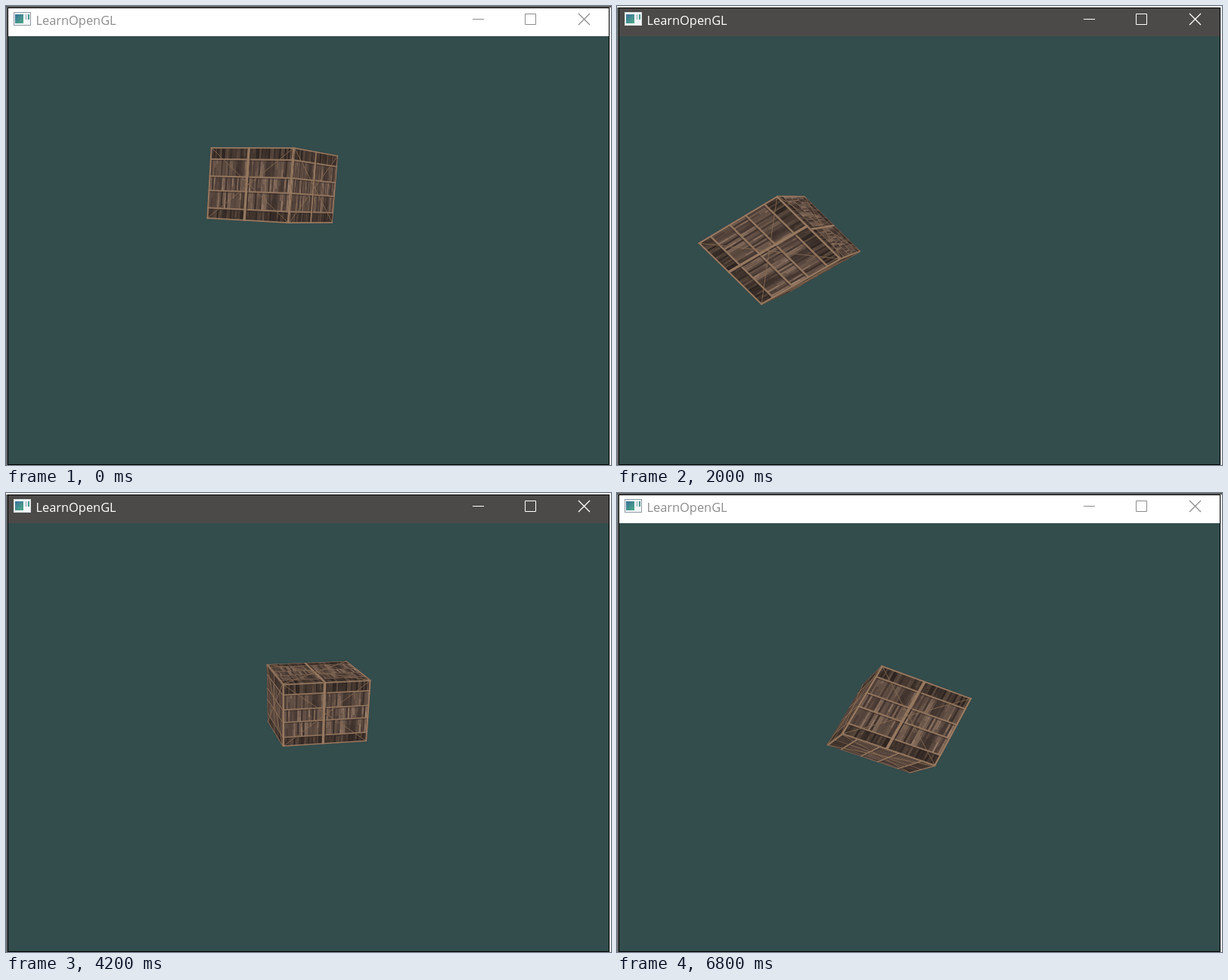
Animation of 800 by 608 pixels, one loop 6.9 s. Source, as an HTML page with a canvas:

```html
<!DOCTYPE html>
<html lang="en">
<head>
<meta charset="utf-8">
<title>LearnOpenGL</title>
<style>
  html, body { margin: 0; width: 100%; height: 100%; overflow: hidden; background: #334c4c; }
  canvas { display: block; }
</style>
</head>
<body>
<canvas id="stage" width="800" height="608"></canvas>
<script>
const ctx = document.getElementById('stage').getContext('2d');
const LOOP = 6900, STEP = 100;
const RAD = Math.PI / 180;
const CX = 402, CY = 340, FX = 966, FY = 724;

// Turning points of the camera, as [seconds, value]
const SIDE = [[0.3, 354], [0.8, 450], [1.45, 200], [1.75, 485], [2.05, 202], [2.35, 488],
  [2.9, 165], [3.7, 391], [4.2, 410], [5.1, 410], [5.6, 360], [6.4, 370]];
const HEIGHT = [[0.3, 239], [0.85, 505], [1.6, 265], [2, 320], [2.7, 328], [3.78, 328],
  [5.05, 122], [5.7, 304]];
const RANGE = [[1, 8], [2, 7.6], [4.2, 8.7], [5.1, 6.6], [5.8, 7.6]];
const TILT = [[2, 13], [2.8, 19], [5.1, 11.5], [6, 13]];
const SPIN = [[0, -34.5], [2, 161.5], [2.7, 223], [4.2, 375], [6.8, 632]];

const linear = x => x;
const swing = x => (1 - Math.cos(Math.PI * x)) / 2;

function track(keys, t, ease = swing) {
  const next = keys.findIndex(k => k[0] > t);
  if (next === 0) return keys[0][1];
  if (next < 0) return keys[keys.length - 1][1];
  const [t0, a] = keys[next - 1], [t1, b] = keys[next];
  return a + (b - a) * ease((t - t0) / (t1 - t0));
}

function random(seed) {
  return () => {
    seed = (seed * 1664525 + 1013904223) >>> 0;
    return seed / 4294967296;
  };
}

// Spin about (0.5, 1, 0), seen by a camera turned so the centre falls on (u, v)
function makeCamera(t) {
  const u = track(SIDE, t), v = track(HEIGHT, t), r = track(RANGE, t);
  const spin = track(SPIN, t, linear) * RAD;
  const c = Math.cos(spin), s = Math.sin(spin), n = 1 - c;
  const ax = Math.sqrt(0.2), ay = 2 * ax;
  const tilt = track(TILT, t) * RAD;
  const st = Math.sin(tilt), ct = Math.cos(tilt);

  const dx = (u - CX) / FX, dy = (CY - v) / FY;
  const yaw = -Math.asin(dx / Math.hypot(dx, dy, 1) / ct);
  const cy = Math.cos(yaw), sy = Math.sin(yaw);
  const pitch = Math.atan2(-1, dy) - Math.atan2(-ct * cy, -st);
  const cp = Math.cos(pitch), sp = Math.sin(pitch);

  return ([x, y, z]) => {
    const wx = (c + 0.2 * n) * x + 0.4 * n * y + ay * s * z;
    const wy = 0.4 * n * x + (c + 0.8 * n) * y - ax * s * z - st * r;
    const wz = -ay * s * x + ax * s * y + c * z - ct * r;
    const ex = wx * cy + wz * sy, ez = wz * cy - wx * sy;
    return [ex, wy * cp - ez * sp, wy * sp + ez * cp];
  };
}

const toScreen = ([x, y, z]) => [CX - FX * x / z, CY + FY * y / z];

const ROWS = [0, 0.165, 0.4, 0.6, 0.845, 1];
const rowLight = row => 1.14 - 0.1 * (row - 2) ** 2;

function wood(light, mix) {
  const tone = (a, b) => Math.round((a + (b - a) * mix) * light);
  return `rgb(${tone(44, 150)},${tone(35, 122)},${tone(33, 102)})`;
}

// Streaks of grain, shared by all faces
const GRAIN = [];
const rnd = random(77), COLS = 48;
for (let row = 0; row < 5; row++) {
  const top = ROWS[row], bottom = ROWS[row + 1];
  for (let i = 0; i < COLS; i++) {
    const cut = top + (bottom - top) * (0.25 + 0.5 * rnd());
    const shade = 0.14 + 0.62 * Math.pow(rnd(), 1.4);
    const x0 = i / COLS, x1 = (i + 1) / COLS;
    GRAIN.push([x0, top, x1, cut, wood(rowLight(row), shade)]);
    GRAIN.push([x0, cut, x1, bottom, wood(rowLight(row), shade * (0.6 + 0.7 * rnd()))]);
  }
}

function drawFace(at) {
  const box = (x0, y0, x1, y1, fill) => {
    ctx.fillStyle = fill;
    ctx.beginPath();
    ctx.moveTo(...at(x0, y0));
    ctx.lineTo(...at(x1, y0));
    ctx.lineTo(...at(x1, y1));
    ctx.lineTo(...at(x0, y1));
    ctx.fill();
  };
  const wire = (x0, y0, x1, y1) => {
    ctx.beginPath();
    ctx.moveTo(...at(x0, y0));
    ctx.lineTo(...at(x1, y1));
    ctx.stroke();
  };

  box(0, 0, 1, 1, '#4a3b35');
  GRAIN.forEach(g => box(...g));
  for (const v of ROWS.slice(1, 5)) {
    box(0, v + 0.009, 1, v + 0.024, '#30262480');
    box(0, v - 0.01, 1, v + 0.01, '#92755d');
  }
  box(0.487, 0, 0.502, 1, '#30262480');
  box(0.458, 0, 0.487, 1, '#96785f');
  ctx.strokeStyle = '#84684f';
  ctx.lineWidth = 0.9;
  wire(0, 0, 1, 1);
  wire(1, 0, 0, 1);
  const edge = '#987a61', e = 0.018;
  box(0, 0, 1, e, edge);
  box(0, 1 - e, 1, 1, edge);
  box(0, 0, e, 1, edge);
  box(1 - e, 0, 1, 1, edge);
}

function drawCube(t) {
  const view = makeCamera(t);
  const centre = view([0, 0, 0]);
  for (let axis = 0; axis < 3; axis++) {
    const along = axis === 0 ? 2 : 0;
    const across = 3 - axis - along;
    for (const side of [1, -1]) {
      const corner = (u, v) => {
        const p = [0, 0, 0];
        p[axis] = side / 2;
        p[along] = (u - 0.5) * (axis === 0 ? -side : side);
        p[across] = 0.5 - v;
        return view(p);
      };
      const mid = corner(0.5, 0.5);
      const facing = mid.reduce((sum, x, i) => sum + x * (x - centre[i]), 0);
      if (facing < 0) drawFace((u, v) => toScreen(corner(u, v)));
    }
  }
}

function rect(x, y, w, h, fill) {
  ctx.fillStyle = fill;
  ctx.fillRect(x, y, w, h);
}

function drawTitleBar(active) {
  const ink = active ? '#ffffff' : '#8c8c8c';
  rect(3, 3, 794, 37, active ? '#4c4a48' : '#ffffff');

  rect(10, 8, 23, 18, active ? '#d7dde0' : '#8f9aa6');
  rect(11, 9, 21, 16, '#f4f7f8');
  const pane = ctx.createLinearGradient(12, 11, 24, 23);
  pane.addColorStop(0, '#3a6f9c');
  pane.addColorStop(1, '#4fae83');
  rect(12, 11, 11, 12, pane);
  rect(25, 11, 3, 7, '#bfd3d8');
  rect(29, 11, 2, 7, '#4b9a92');

  ctx.fillStyle = ink;
  ctx.font = '16.4px "Open Sans", "Noto Sans", sans-serif';
  ctx.fillText('LearnOpenGL', 39.5, 25);

  ctx.strokeStyle = ink;
  ctx.lineWidth = 1;
  ctx.beginPath();
  ctx.moveTo(617, 17.5);
  ctx.lineTo(632, 17.5);
  ctx.rect(686.5, 10.5, 14, 14);
  ctx.stroke();
  ctx.lineWidth = 1.3;
  ctx.beginPath();
  ctx.moveTo(757, 10);
  ctx.lineTo(772, 25);
  ctx.moveTo(772, 10);
  ctx.lineTo(757, 25);
  ctx.stroke();
}

function drawFrame(active) {
  rect(0, 0, 800, 2, active ? '#f2f2f2' : '#5c5c5c');
  rect(0, 2, 2, 606, '#6b7070');
  rect(798, 2, 2, 606, '#e4e6e6');
  ctx.strokeStyle = '#000';
  ctx.lineWidth = 1;
  ctx.strokeRect(2.5, 2.5, 795, 605);
}

function draw() {
  const t = Math.floor(performance.now() % LOOP / STEP) * STEP / 1000;
  const active = t >= 0.4 && t < 6.6;
  rect(0, 0, 800, 608, '#334c4c');
  ctx.save();
  ctx.beginPath();
  ctx.rect(3, 40, 794, 567);
  ctx.clip();
  drawCube(t);
  ctx.restore();
  drawTitleBar(active);
  drawFrame(active);
  requestAnimationFrame(draw);
}
draw();
</script>
</body>
</html>
```
